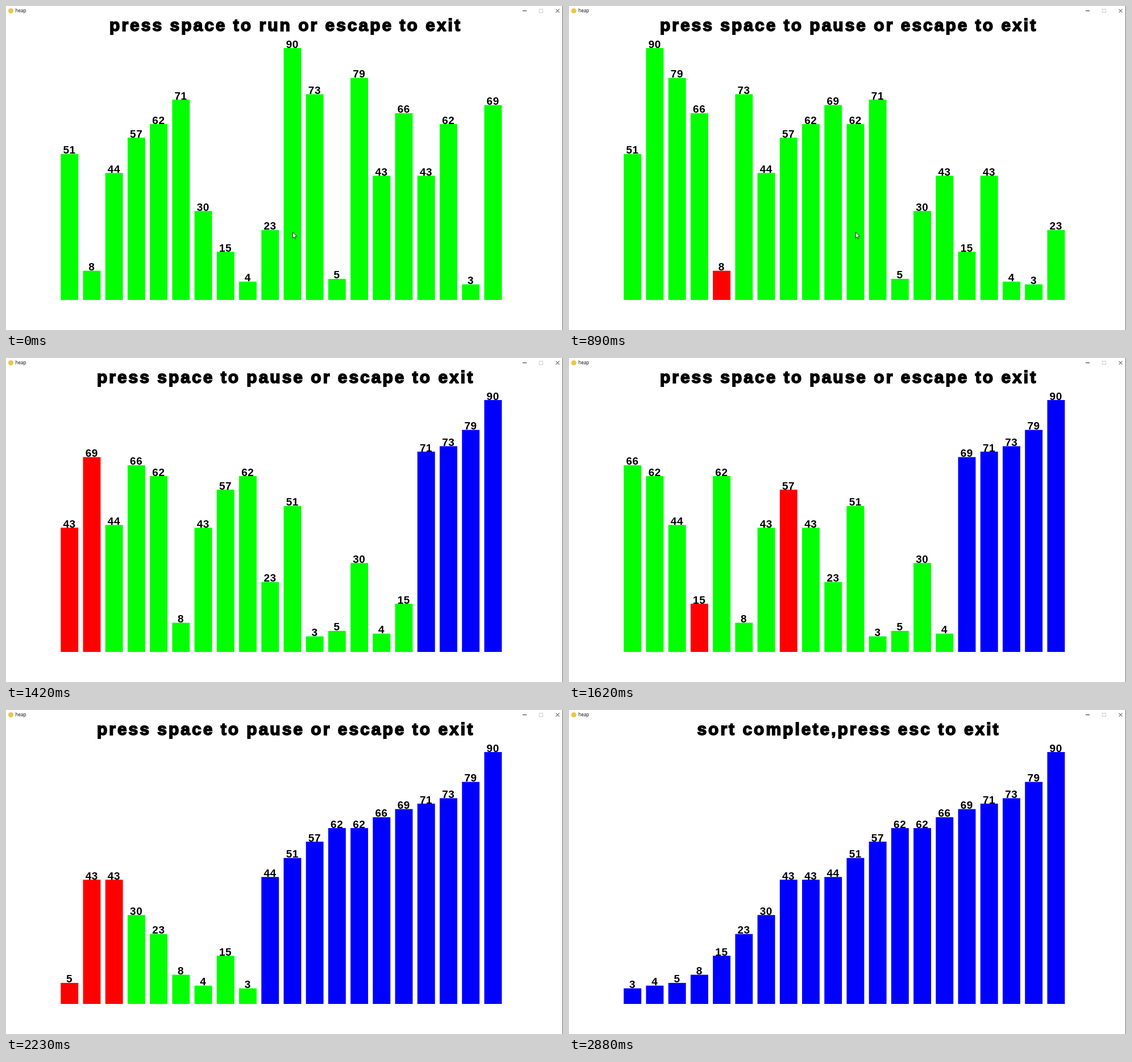
An HTML page with a canvas for the animation above (3240 ms loop, 980 by 571 pixels).

```html
<!DOCTYPE html>
<html lang="en">
<head>
<meta charset="utf-8">
<title>heap</title>
<style>
  html, body { margin: 0; width: 100%; height: 100%; overflow: hidden; background: #fff; }
  canvas { display: block; }
</style>
</head>
<body>
<canvas id="stage" width="980" height="571"></canvas>
<script>
const ctx = document.getElementById('stage').getContext('2d');
const LOOP = 3240;
const values = [51, 8, 44, 57, 62, 71, 30, 15, 4, 23, 90, 73, 5, 79, 43, 66, 43, 62, 3, 69];
const titles = {
  ready: 'press space to run or escape to exit',
  busy: 'press space to pause or escape to exit',
  done: 'sort complete,press esc to exit'
};

// Run the heap sort once and keep every drawn step.
function record(start) {
  const a = [...start], size = a.length, steps = [];
  let sorted = size;
  const snap = (red = [], title = titles.busy) => steps.push({ a: [...a], red, sorted, title });
  const swap = (i, j) => { [a[i], a[j]] = [a[j], a[i]]; };

  function heapify(n, i) {
    const red = [i];
    let largest = i;
    snap([...red]);
    for (const child of [2 * i + 1, 2 * i + 2]) {
      if (child >= n) break;
      red.push(child);
      snap([...red]);
      if (a[child] > a[largest]) largest = child;
    }
    if (largest !== i) {
      swap(i, largest);
      heapify(n, largest);
    }
  }

  snap([], titles.ready);
  for (let i = size / 2 - 1; i >= 0; i--) heapify(size, i);
  for (let end = size - 1; end > 0; end--) {
    swap(0, end);
    sorted = end;
    snap();
    heapify(end, 0);
  }
  sorted = 0;
  snap([], titles.done);
  return steps;
}

const steps = record(values);

// [time, step]: the sort runs at an uneven pace.
const pace = [[450, 2], [610, 17], [650, 17], [1140, 61], [1420, 90],
              [1860, 128], [2230, 165], [2880, steps.length - 1]];

// Runs of 40 ms ticks: [first, last].
const runs = [[450, 1090], [1140, 1860], [1910, 2590], [2640, 2880]];

function tick(t) {
  const run = runs.filter(r => t >= r[0]).pop();
  if (!run) return 0;
  return Math.min(run[1], run[0] + Math.floor((t - run[0]) / 40) * 40);
}

function stepAt(t) {
  if (t < pace[0][0]) return steps[0];
  const k = pace.findIndex(p => p[0] > t);
  if (k < 0) return steps[steps.length - 1];
  const [t0, s0] = pace[k - 1], [t1, s1] = pace[k];
  return steps[Math.round(s0 + (s1 - s0) * (t - t0) / (t1 - t0))];
}

function line(color, ...points) {
  ctx.strokeStyle = color;
  ctx.lineWidth = 1;
  ctx.beginPath();
  points.forEach(([x, y]) => ctx.lineTo(x, y));
  ctx.stroke();
}

function text(str, x, y, font, align, spacing = 0) {
  ctx.font = font;
  ctx.textAlign = align;
  ctx.letterSpacing = spacing + 'px';
  ctx.fillStyle = '#000';
  ctx.fillText(str, x, y);
}

function drawWindow() {
  ctx.fillStyle = '#fff';
  ctx.fillRect(0, 0, 980, 571);
  ctx.fillStyle = '#e8c84a';
  ctx.beginPath();
  ctx.arc(8.5, 8.5, 4.5, 0, 7);
  ctx.fill();
  text('heap', 16.5, 11.3, '8.1px "Open Sans", sans-serif', 'left');
  line('#222', [909, 8.5], [916, 8.5]);
  ctx.strokeStyle = '#ccc';
  ctx.strokeRect(938.5, 5.5, 6, 6);
  line('#222', [967.5, 5.5], [973.5, 11.5]);
  line('#222', [973.5, 5.5], [967.5, 11.5]);
  line('#666', [979.5, 0], [979.5, 571]);
}

function drawTitle(str) {
  text(str, 492, 44.2, 'bold 30px "Liberation Sans", Arial, sans-serif', 'center', 3);
  ctx.strokeStyle = '#000';
  ctx.lineWidth = 1.8;
  ctx.miterLimit = 2;
  ctx.strokeText(str, 492, 44.2);
}

function drawBar(value, i, color) {
  const x = 96.3 + 39.22 * i, h = 13.1 + 4.787 * value;
  ctx.fillStyle = color;
  ctx.fillRect(x, 518 - h, 30.9, h);
  text(value, x + 15.2, 517.5 - h, 'bold 19px "Liberation Sans", Arial, sans-serif', 'center', 0.5);
}

function drawCursor(x, y) {
  ctx.beginPath();
  [[0, 0], [0, 10.5], [2.4, 8.4], [4, 12], [5.6, 11.3], [4.1, 7.8], [7.2, 7.6]]
    .forEach(([dx, dy]) => ctx.lineTo(x + dx, y + dy));
  ctx.closePath();
  ctx.fillStyle = '#fff';
  ctx.fill();
  ctx.strokeStyle = '#000';
  ctx.lineWidth = 0.8;
  ctx.stroke();
}

function draw(now) {
  const t = tick(now % LOOP), { a, red, sorted, title } = stepAt(t);
  drawWindow();
  drawTitle(title);
  a.forEach((v, i) => drawBar(v, i, i >= sorted ? '#00f' : red.includes(i) ? '#f00' : '#0f0'));
  // The pointer leaves through the bottom edge.
  drawCursor(504.3, 398.5 + Math.max(0, t - 970) * 1.4);
  requestAnimationFrame(draw);
}
requestAnimationFrame(draw);
</script>
</body>
</html>
```
